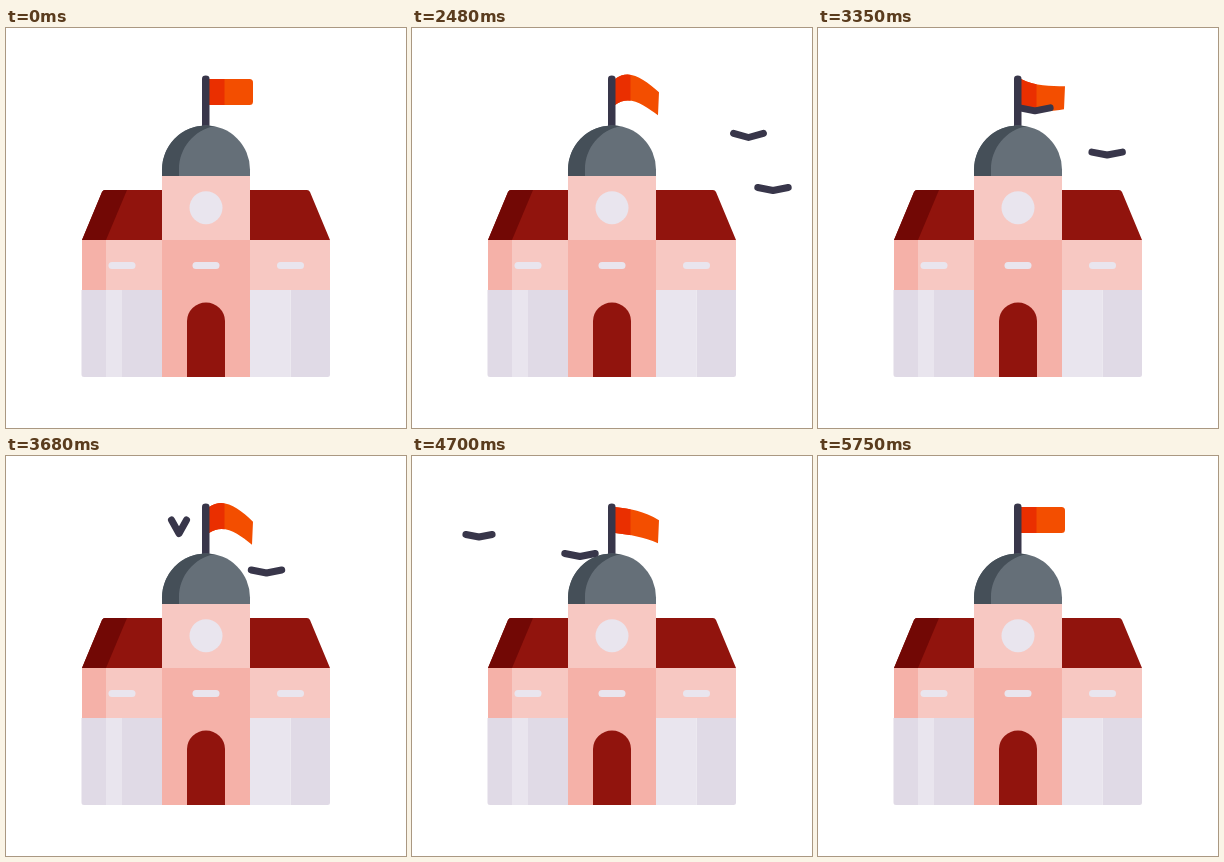
Recreate the animation shown at these times as an HTML page. Size 400 by 400 pixels, loop 6.95 s.

```html
<!DOCTYPE html>
<html lang="en">
<head>
<meta charset="utf-8">
<title>Building with flag and birds</title>
<style>
  html, body { margin: 0; width: 100%; height: 100%; overflow: hidden; background: #fff; }
  svg { display: block; width: 100vw; height: 100vh; }
  .pale { fill: #e9e5ee; }
  .lilac { fill: #e0dae6; }
  .pink { fill: #f7c8c2; }
  .rose { fill: #f5b1a8; }
  .red { fill: #91140d; }
  .bird { fill: none; stroke: #38364a; stroke-width: 7; stroke-linecap: round; stroke-linejoin: round; }
</style>
</head>
<body>
<svg viewBox="0 0 400 400">
  <defs><clipPath id="flagShape"><path id="flag"/></clipPath></defs>

  <g clip-path="url(#flagShape)">
    <path fill="#f34e00" d="M200 30h60v80h-60z"/>
    <path fill="#ea2f00" d="M200 30h18.5v80h-18.5z"/>
  </g>
  <path fill="#38364a" d="M196 100V50.5q0-3 3.75-3t3.75 3V100z"/>

  <path fill="#656f78" d="M156 148v-6.500a44 44 0 0 1 88 0v6.500z"/>
  <path fill="#454f58" d="M156 148v-6.500A44 44 0 0 1 208.500 98.300C188 102 173 120 173 141.500v6.500z"/>

  <path class="red" d="M156 162H99q-2 0-3 2L76 212h80zM244 162h57q2 0 3 2L324 212h-80z"/>
  <path fill="#720805" d="M121 162H99q-2 0-3 2L76 212h24z"/>

  <path class="pink" d="M100 212h56v50h-56zM244 212h80v50h-80zM156 148h88v64h-88z"/>
  <path class="rose" d="M76 212h24v50H76zM156 212h88v137h-88z"/>
  <path class="lilac" d="M75.500 262H156v87H78q-2.500 0-2.500-2.500zM284.500 262H324v84.500q0 2.500-2.500 2.500h-37z"/>
  <path class="pale" d="M100 262h16v87h-16zM244 262h40.500v87H244z"/>

  <circle class="pale" cx="200" cy="179.700" r="16.500"/>
  <g class="pale">
    <rect x="102.500" y="234" width="27" height="7" rx="3.500"/>
    <rect x="186.500" y="234" width="27" height="7" rx="3.500"/>
    <rect x="271" y="234" width="27" height="7" rx="3.500"/>
  </g>
  <path class="red" d="M181 349v-56a19 18.500 0 0 1 38 0v56z"/>

  <path class="bird"/>
  <path class="bird"/>
</svg>
<script>
const LOOP = 6950, START = 2030, END = 5750, STEP = 30;
const WAVE_START = 2000, WAVE_PERIOD = 1240;
const flag = document.getElementById('flag');
const birdPaths = document.querySelectorAll('.bird');
const clamp = v => Math.max(0, Math.min(1, v));
const wave = turns => Math.sin(2 * Math.PI * turns);

// route: [time, x, y] of the body; flapAt: a moment with the wings fully raised
const birds = [
  { flapAt: 3680, lift: 50, route: [[2030, 395, 129], [2480, 336.5, 109.5], [3020, 264, 91.5],
    [3680, 173, 77.5], [4700, 67, 81], [5070, 34, 88]] },
  { flapAt: 3020, lift: 42, route: [[2030, 395, 185], [2480, 361, 162.5], [3020, 317, 139.5],
    [3680, 260.5, 117], [4700, 168, 100.5], [5610, 90, 93]] }
];

// Smooth Hermite interpolation along a timed route
function along(route, t, axis) {
  const last = route.length - 1;
  const slope = i => {
    const a = route[Math.max(0, i - 1)], b = route[Math.min(last, i + 1)];
    return (b[axis] - a[axis]) / (b[0] - a[0]);
  };
  let i = 0;
  while (i < last - 1 && t >= route[i + 1][0]) i++;
  const p = route[i], q = route[i + 1], span = q[0] - p[0];
  const u = (t - p[0]) / span, v = 1 - u;
  return p[axis] * v * v * (1 + 2 * u) + q[axis] * u * u * (1 + 2 * v)
    + span * u * v * (slope(i) * v - slope(i + 1) * u);
}

function drawBird(path, { route, flapAt, lift }, t) {
  const begin = route[0][0], end = route[route.length - 1][0];
  if (t < begin || t >= end) return path.setAttribute('d', '');
  const x = along(route, t, 1), y = along(route, t, 2);
  const period = 1400, halfFlap = 250;
  const phase = (t - flapAt + 3.5 * period) % period - period / 2;
  const raise = Math.abs(phase) < halfFlap ? Math.cos(phase / halfFlap * Math.PI / 2) ** 2 : 0;
  const angle = (11 + lift * raise) * Math.PI / 180;
  const length = 15.5 * clamp((t - begin + 20) / 440) * clamp((end - t) / 430);
  const dx = length * Math.cos(angle), dy = length * Math.sin(angle);
  path.setAttribute('d', `M${x - dx} ${y - dy}L${x} ${y}L${x + dx} ${y - dy}`);
}

function drawFlag(t) {
  const turns = (t - WAVE_START) / WAVE_PERIOD;
  const waving = t >= START && t < END;
  const amount = waving ? clamp((t - WAVE_START) / 250) * clamp((END - 30 - t) / 250) : 0;
  const tip = waving && t < END - 30 ? 13 * wave(turns) + 2.7 * (1 - wave(turns + 0.25)) : 0;
  const near = -12 * amount * wave(turns - 0.2);
  const far = amount * (5.5 - 5 * wave(turns - 0.13)) + (1 - amount) * tip * 0.7;
  const r = 3.5 * (1 - amount), right = 247, top = 51 + tip, bottom = 77 + tip - 3 * amount;
  flag.setAttribute('d', `M203 51C218 ${51 + near} 232 ${51 + far} ${right - r} ${top}
    Q${right} ${top} ${right} ${top + r}L${right - amount} ${bottom - r}
    Q${right - amount} ${bottom} ${right - amount - r} ${bottom}
    C232 ${77 + far} 218 ${77 + near} 203 77z`);
}

function frame() {
  const now = performance.now() % LOOP;
  const t = START + Math.floor((now - START) / STEP) * STEP;
  drawFlag(t);
  birds.forEach((bird, i) => drawBird(birdPaths[i], bird, t));
  requestAnimationFrame(frame);
}
frame();
</script>
</body>
</html>
```
